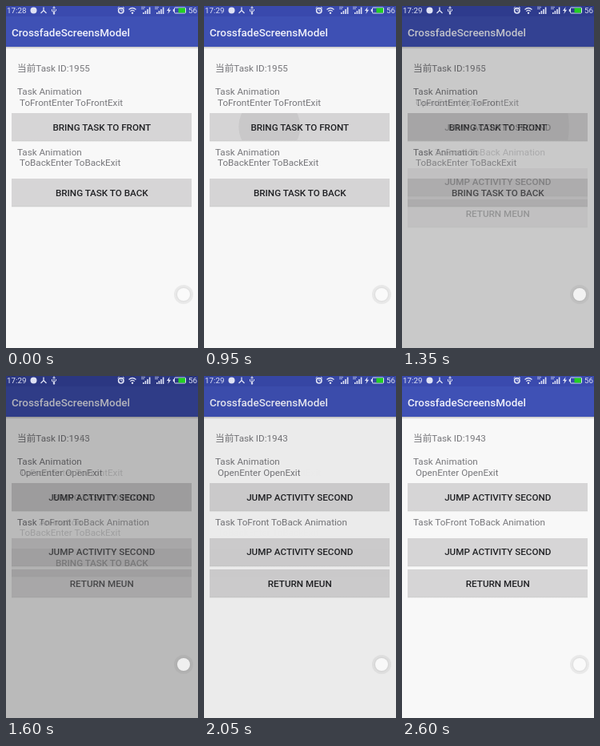
Write an HTML page that moves like this. It is 240 by 428 pixels and loops after 2.65 s.

```html
<!DOCTYPE html>
<html lang="en">
<head>
<meta charset="utf-8">
<title>Task crossfade</title>
<style>
  html, body { margin: 0; width: 100%; height: 100%; overflow: hidden; background: #000; }
  svg { display: block; width: 240px; height: 428px; }
  text { font: 11.68px Roboto, "Noto Sans CJK SC", "Noto Sans CJK", sans-serif; white-space: pre; }
  .body { fill: #77777b; }
  .label { font-weight: 500; fill: #222326; text-anchor: middle; }
  .title { font-size: 13.45px; font-weight: 500; fill: #f0f1fa; }
  .status { font-size: 9.8px; fill: #dfe2f4; }
  .button { fill: #d6d5d6; }
  .line { fill: none; stroke: #dfe2f4; }
  .solid { fill: #dfe2f4; }

  .leave, .enter, .ripple, .before, .after { animation: 2650ms linear infinite; }
  .leave { animation-name: leave; }
  .enter { animation-name: enter; }
  .ripple { animation-name: ripple; fill: #000; }
  .before { animation-name: before; }
  .after { animation-name: after; }

  /* sine ease in and out, 900 ms to 2250 ms */
  @keyframes leave {
    0% { opacity: 1; }
    33.96% { opacity: 1; animation-timing-function: cubic-bezier(.364, 0, .636, 1); }
    84.91%, 100% { opacity: 0; }
  }
  @keyframes enter {
    0% { opacity: 0; }
    33.96% { opacity: 0; animation-timing-function: cubic-bezier(.364, 0, .636, 1); }
    84.91%, 100% { opacity: 1; }
  }
  @keyframes ripple {
    0%, 18.8% { r: 8px; cx: 79px; opacity: 0; }
    22.64% { r: 16px; cx: 79px; opacity: .05; }
    41.5% { r: 48px; cx: 83px; opacity: .06; }
    56%, 100% { r: 130px; cx: 120px; opacity: .07; }
  }
  @keyframes before {
    0%, 11.32% { visibility: visible; }
    11.33%, 100% { visibility: hidden; }
  }
  @keyframes after {
    0%, 11.32% { visibility: hidden; }
    11.33%, 100% { visibility: visible; }
  }
</style>
</head>
<body>
<svg viewBox="0 0 240 428">
  <defs>
    <linearGradient id="shade" x2="0" y2="1">
      <stop stop-opacity=".22"/>
      <stop offset="1" stop-opacity="0"/>
    </linearGradient>
    <clipPath id="first"><rect x="7" y="134" width="225" height="34"/></clipPath>
    <g id="window">
      <rect width="240" height="428" fill="#f8f8f8"/>
      <rect y="51" width="240" height="3" fill="url(#shade)"/>
      <rect width="240" height="51" fill="#3f51b5"/>
      <rect width="240" height="13" fill="#3a4aae"/>
      <text class="title" x="7" y="38">CrossfadeScreensModel</text>
      <text class="body" x="14" y="110.7">Task Animation</text>
    </g>
    <g id="button">
      <rect x="7" y="34" width="225" height="2" fill="url(#shade)"/>
      <rect class="button" x="7" width="225" height="34"/>
    </g>
    <g id="signal" class="solid">
      <path d="M2 8h1.6v2H2zM4.6 6h1.6v4H4.6zM7.2 4h1.6v6H7.2zM9.8 1.5h1.6V10H9.8z"/>
      <path d="M0 1h5v1H0zM0 3h4v1H0z" opacity=".7"/>
    </g>
  </defs>

  <rect width="240" height="428"/>

  <g class="leave">
    <use href="#window"/>
    <text class="body" x="14" y="81.7">当前Task ID:1955</text>
    <text class="body" x="17" y="124.6">ToFrontEnter ToFrontExit</text>
    <use href="#button" y="134"/>
    <g clip-path="url(#first)"><circle class="ripple" cx="79" cy="151" r="8"/></g>
    <text class="label" x="119.8" y="155.6">BRING TASK TO FRONT</text>
    <text class="body" x="14" y="186.6">Task Animation</text>
    <text class="body" x="17" y="199.6">ToBackEnter ToBackExit</text>
    <use href="#button" y="216"/>
    <text class="label" x="119.8" y="237.6">BRING TASK TO BACK</text>
  </g>

  <g class="enter">
    <use href="#window"/>
    <text class="body" x="14" y="81.7">当前Task ID:1943</text>
    <text class="body" x="17" y="124.6">OpenEnter OpenExit</text>
    <use href="#button" y="134"/>
    <text class="label" x="119.8" y="155.6">JUMP ACTIVITY SECOND</text>
    <text class="body" x="14" y="186.6">Task ToFront ToBack Animation</text>
    <use href="#button" y="203"/>
    <text class="label" x="119.8" y="224.4">JUMP ACTIVITY SECOND</text>
    <use href="#button" y="242"/>
    <text class="label" x="119.8" y="263.6">RETURN MEUN</text>
  </g>

  <!-- system overlay, never dimmed -->
  <text class="status before" x="1" y="9">17:28</text>
  <text class="status after" x="1" y="9">17:29</text>
  <circle class="solid" cx="34.5" cy="5.5" r="4"/>
  <path class="line" stroke-width="1.3" d="M47 1.5v4l-3.5 3.5M47 5.5l3.5 3.5"/>
  <path class="line" d="M60 1v9M57.5 4v2.5l2.5 1.5l2.5-2V4M58.5 2.5L60 .8l1.5 1.7"/>
  <circle class="solid" cx="60" cy="9.4" r="1.2"/>

  <circle class="line" stroke-width="1.6" cx="143.8" cy="5.8" r="3.2"/>
  <path class="line" d="M143.8 3.8v2.2h1.8M139.6 2.8l1.9-1.7M148 2.8l-1.9-1.7"/>
  <path class="line" stroke-width="1.2" d="M153.5 4.5q4.5-4 9 0M155.2 6.6q2.8-2.4 5.6 0"/>
  <circle class="solid" cx="158" cy="8.7" r="1.2"/>
  <use href="#signal" x="169"/>
  <use href="#signal" x="186"/>
  <path class="solid" d="M204.6 1l-3.6 5h2.2l-.9 4l3.8-5.2h-2.3z"/>
  <rect class="line" x="210.5" y="2" width="14" height="7" rx="1"/>
  <rect x="215.5" y="2.5" width="8.5" height="6" fill="#22d022"/>
  <rect class="solid" x="208.8" y="4" width="1.3" height="3"/>
  <text class="status" x="228" y="9">56</text>

  <circle cx="222" cy="361" r="12" fill="#777" fill-opacity=".11"/>
  <circle cx="222" cy="361" r="9.5" fill="#777" fill-opacity=".07"/>
  <circle cx="222" cy="361" r="8" fill="#fff" fill-opacity=".8"/>
</svg>
</body>
</html>
```
